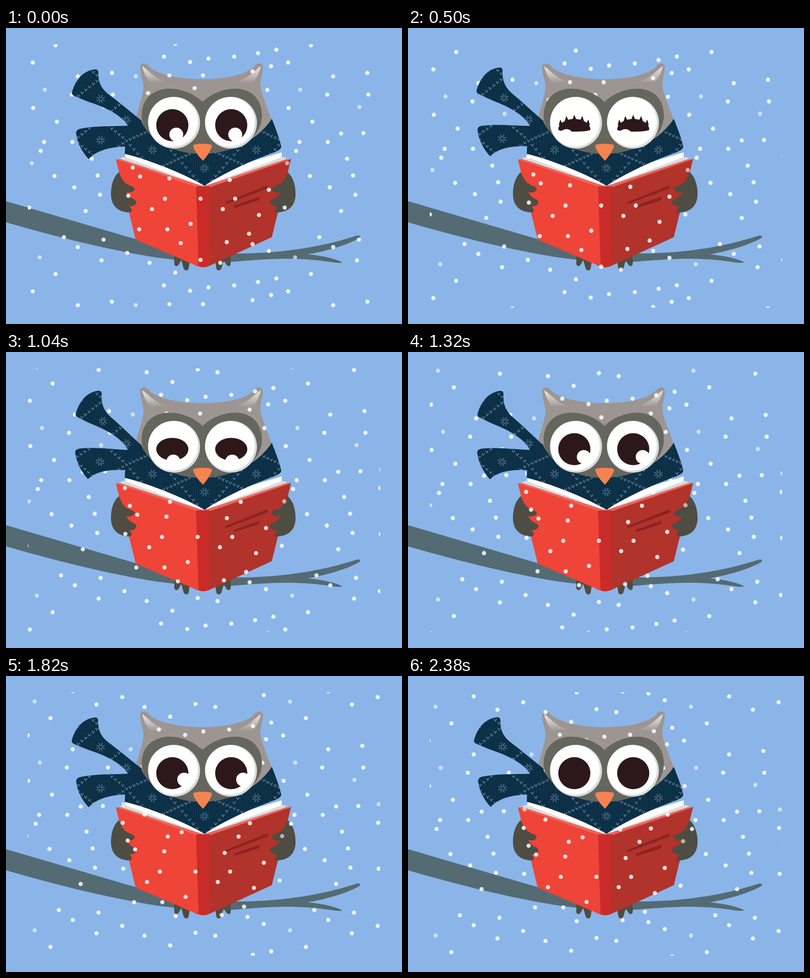
These frames come from a looping animation (800x600 px, 2.4 s). An HTML page with a canvas:

```html
<!DOCTYPE html>
<html lang="en">
<head>
<meta charset="utf-8">
<title>Reading owl in the snow</title>
<style>
html, body { margin: 0; width: 100%; height: 100%; overflow: hidden; background: #8bb5e8; }
canvas { display: block; }
</style>
</head>
<body>
<canvas id="stage" width="800" height="600"></canvas>
<script>
const ctx = document.getElementById('stage').getContext('2d');
const LOOP = 2400, STEP = 20, LAST_MOVE = 110;
const TAU = Math.PI * 2;
const DARK = '#4d4d43';

// Snow tile: flake positions at time zero, repeated every TILE_W x TILE_H.
const TILE_W = 516, TILE_H = 463.7;
const FLAKES = [
  100,35, 342,32, 54,70, 319,58, 372,69, 409,62, 461,58, 509,51, 546,44, 535.5,77.5,
  145,98, 214,91, 330,96, 398,96, 498,88, 133,135, 287,132, 381,122, 528,125.5, 216,135,
  55,162, 103,190, 161,214, 206,213, 77,231, 134,231, 70,249, 173,265, 98,300, 185,299,
  256,283, 271,301, 330,305, 452,308, 138,323, 190,338, 247,340, 321,346, 393,346, 463,346,
  531,328, 47,364, 161,371, 295,367, 438,367, 511,379, 373,397, 269,408, 326,408, 491,417,
  446,434, 353,436, 117,424, 145,444, 197,429, 193,471, 245,456, 290,476, 393,470, 433,476,
  498,438, 531,452, 246,247, 337,275, 480,275, 290,230, 503,248, 537,220, 441,250, 358,236,
  365,266
];
const FAINT = [262,98, 78.5,125, 198,160, 52,274, 68,465, 247.5,209.5];

const path = d => new Path2D(d);
const BRANCH = path('M0 351 L262 428 C320 446 380 457 455 457 C540 458 630 447 710 420.5 Q717 420 715 425 C690 440 650 451 610 459 Q655 463 679 474.5 Q678 477 664 475.5 C590 464 540 467 455 474 C400 477 340 471 290 463 C190 446 90 420 0 394 Z');
const HEAD = path('M271 82 C270 72 279 68 287 76 C318 112 472 114 503 76 C511 68 520 72 519 82 C517 97 513 108 514 119 C518 140 528 160 537 187 L530 225 L262 225 L262 185 C267 160 276 142 278 120 C277 107 272 96 271 82 Z');
const EAR = path('M275 78 C284 81 296 101 326 110 Q306 109 291 112 C284 101 278 90 275 78 Z');
const MASK = path('M397 150 C381 133 352 122 327 123 C292 125 274 148 274 178 C275 222 325 260 397 260 C468 260 516 222 517 178 C517 148 500 125 466 123 C441 122 414 133 397 150 Z');
const SCARF = path('M247 195 L272 186 C285 222 332 256 397 255 C458 255 511 224 537 184 C545 205 552 222 556 240 C556 246 550 248 540 253 C490 270 430 300 401 320 C370 301 300 270 240 255 C240 235 243 215 247 195 Z');
const UPPER_TAIL = path('M180 84 Q187 84 186 93 C186 112 194 124 206 134 C230 152 254 172 274 188 L268 210 L247 199 C236 179 205 163 176 153 C158 147 148 142 136 137 Q132 135 133 130 C140 106 154 87 180 84 Z');
const LOWER_TAIL = path('M250 198 C215 200 180 198 149 205 Q140 208 142 216 C145 236 155 253 167 266 C183 249 208 241 245 240 Z');
const PAGE_GREY = path('M228 265.5 L238 261 L399 318 L390 320 Z');
const PAGE_WHITE = path('M241 252 L241 262 L385 315.5 L399 320 L399 300 Z');
const COVER_TOP = path('M222 266 L231 265.5 L390 318 L399 321 L384 322 Z');
const WING = path('M228 292 C215 304 212 322 212 338 C213 361 226 373 250 374 C256 373 255 366 249 362 C258 361 265 358 263 351 C261 346 250 347 243 333 C251 334 259 333 260 326 C257 319 245 320 238 311 Q232 303 228 292 Z');
const CLAWS = path('M340 460 L340 479 Q344 487 350 478 L354 470 L359 488 Q365 495 369 488 L373 462 Z M378 470 L382 481 Q386 484 390 480 L390 470 Z');
const BEAK = path('M379 242 Q376 237 382 236 Q398 233 413 236 Q418 238 415 243 C411 253 405 261 398 269 C391 262 383 253 379 242 Z');

function fill(shape, color) {
  ctx.fillStyle = color;
  ctx.fill(shape);
}

function disc(x, y, r, color) {
  ctx.fillStyle = color;
  ctx.beginPath();
  ctx.arc(x, y, r, 0, TAU);
  ctx.fill();
}

function poly(color, ...pts) {
  ctx.fillStyle = color;
  ctx.beginPath();
  for (let i = 0; i < pts.length; i += 2) ctx.lineTo(pts[i], pts[i + 1]);
  ctx.fill();
}

// Draws once as is and once mirrored across the owl's middle.
function both(axis, draw) {
  draw();
  ctx.save();
  ctx.translate(axis * 2, 0);
  ctx.scale(-1, 1);
  draw();
  ctx.restore();
}

// keys: rows of [time, ...values], linear between rows
function track(keys, t) {
  let i = 0;
  while (i < keys.length - 2 && t >= keys[i + 1][0]) i++;
  const a = keys[i], b = keys[i + 1];
  const k = Math.min(1, Math.max(0, (t - a[0]) / (b[0] - a[0])));
  return a.slice(1).map((v, n) => v + (b[n + 1] - v) * k);
}

function drawEars() {
  const g = ctx.createLinearGradient(0, 78, 0, 112);
  g.addColorStop(0, '#e9e6e5');
  g.addColorStop(0.5, '#c6c0be');
  g.addColorStop(1, '#9d9592');
  both(395, () => fill(EAR, g));
}

function drawBook() {
  both(399, () => { fill(PAGE_GREY, '#d9dbdd'); fill(PAGE_WHITE, '#fff'); });
  poly('#ef4438', 222,266, 385,321, 390,484, 262,429);
  poly('#b1332b', 576,265, 409,321, 409,483, 537,424);
  both(399, () => fill(COVER_TOP, '#f0645b'));
  fill(path('M384 321 L410 321 L411 482 Q400 488 389 483 Z'), '#c92c28');
  poly('#8a2421', 443,353, 528,319, 529,325, 444,357);
  poly('#8a2421', 461,360, 512,342, 511,349, 461,365);
}

function drawSnow(step) {
  const dx = -0.1118 * step, dy = 0.5545 * step;
  const scatter = (list, alpha) => {
    ctx.fillStyle = `rgba(255,255,255,${alpha})`;
    ctx.beginPath();
    for (let i = 0; i < list.length; i += 2) {
      for (let c = 0; c < 2; c++) for (let r = -1; r < 2; r++) {
        const x = list[i] + dx + c * TILE_W, y = list[i + 1] + dy + r * TILE_H;
        ctx.moveTo(x + 4.3, y);
        ctx.arc(x, y, 4.3, 0, TAU);
      }
    }
    ctx.fill();
  };
  ctx.save();
  ctx.beginPath();
  ctx.rect(44, 33, 712, 534);
  ctx.clip();
  scatter(FLAKES, 0.83);
  scatter(FAINT, 0.58);
  ctx.restore();
}

// Knitted diamonds with a star in each; slant tilts both halves upwards.
function knit(shape, cx, cy, slant) {
  ctx.save();
  fill(shape, '#0e344b');
  ctx.clip(shape);
  ctx.lineWidth = 1;
  ctx.strokeStyle = 'rgba(3,24,40,.4)';
  ctx.beginPath();
  for (let x = cx - 170; x < cx + 170; x += 3.75) {
    ctx.moveTo(x, cy - 110);
    ctx.lineTo(x, cy + 140);
  }
  ctx.stroke();
  ctx.lineWidth = 1.4;
  ctx.strokeStyle = 'rgba(139,160,187,.75)';
  ctx.beginPath();
  const mod = n => ((n % 14) + 14) % 14;
  for (let i = -22; i <= 22; i++) for (let j = -20; j <= 24; j++) {
    const x = cx + i * 7.5, y = cy + j * 6 - slant * Math.abs(i * 7.5);
    const a = mod(i + j), b = mod(i - j);
    if (a === 7 || b === 7) {
      ctx.moveTo(x - 2.8, y - 2.5);
      ctx.lineTo(x, y + 2);
      ctx.lineTo(x + 2.8, y - 2.5);
    } else if (a === 0 && b === 0) {
      for (let s = 0; s < 8; s++) {
        const c = Math.cos(s * TAU / 8 + TAU / 16), d = Math.sin(s * TAU / 8 + TAU / 16);
        ctx.moveTo(x + c * 2.5, y + d * 2.5);
        ctx.lineTo(x + c * 9, y + d * 9);
      }
    }
  }
  ctx.stroke();
  ctx.restore();
}

// Shears a tail so that its root (rx, ry) stays and its end (ex, ey) moves by (dx, dy).
function drawTail(shape, rx, ry, ex, ey, dx, dy) {
  const vx = ex - rx, vy = ey - ry, len2 = vx * vx + vy * vy;
  const ux = vx / len2, uy = vy / len2, u0 = -(rx * ux + ry * uy);
  ctx.save();
  ctx.transform(1 + dx * ux, dy * ux, dx * uy, 1 + dy * uy, dx * u0, dy * u0);
  knit(shape, 191, 144, 0);
  ctx.restore();
}

function drawScarf(step) {
  const sway = 0.54 * (1 - Math.cos(TAU * (step / 9.16 + 0.055)));
  drawTail(LOWER_TAIL, 245, 218, 155, 235, -3 * sway, -15 * sway);
  drawTail(UPPER_TAIL, 250, 190, 160, 112, 12.5 * sway, -9 * sway);
  knit(SCARF, 401, 284, 0.35);
}

// lid: middle line, height above it, height below it
const LID = [[0, 197, 32.5, 32.5], [100, 197, 23, 23], [200, 206, 22, 3.5],
  [720, 206, 21.5, 4.5], [840, 206, 22, 5], [1040, 197, 23, 23], [1160, 197, 32.5, 32.5], [LOOP, 197, 32.5, 32.5]];
const GLINT = [[0, 8, 216], [220, -16, 219], [600, -16, 219], [720, -14, 217],
  [1040, 2, 222], [1400, 24, 210], [LOOP, 24, 210]];

function drawEye(scleraX, pupilX, t) {
  disc(scleraX, 192, 52.5, '#d9dadb');
  disc(scleraX - 2, 190.3, 50.3, '#fff');
  const [mid, up, down] = track(LID, t);
  ctx.fillStyle = '#2c181a';
  ctx.beginPath();
  ctx.ellipse(pupilX, mid, 32.5, up, 0, Math.PI, TAU);
  ctx.ellipse(pupilX, mid, 32.5, down, 0, 0, Math.PI);
  ctx.fill();
  if (down < 10) {
    for (let i = -2; i <= 2; i++) {
      const a = i * 0.49;
      const x = pupilX + 32.5 * Math.sin(a), y = mid - up * Math.cos(a);
      poly('#2c181a', x - 4.5, y + 3, x + i * 0.7, y - 8.5, x + 4.5, y + 3);
    }
  }
  if (t < 2380) {
    const [gx, gy] = track(GLINT, t);
    disc(pupilX + gx, gy, 14, '#fff');
  }
}

function draw(time) {
  const n = Math.floor((time % LOOP) / STEP), t = n * STEP;
  const step = Math.min(n, LAST_MOVE);
  ctx.fillStyle = '#8bb5e8';
  ctx.fillRect(0, 0, 800, 600);
  fill(BRANCH, '#546b74');
  both(397, () => fill(CLAWS, DARK));
  fill(HEAD, '#9d9592');
  drawEars();
  drawBook();
  both(398.5, () => fill(WING, DARK));
  drawSnow(step);
  fill(MASK, '#65665e');
  drawScarf(step);
  drawEye(339.5, 336, t);
  drawEye(454.5, 455, t);
  fill(BEAK, '#f58350');
}

const start = performance.now();
function tick() {
  draw(performance.now() - start);
  requestAnimationFrame(tick);
}
tick();
</script>
</body>
</html>
```
